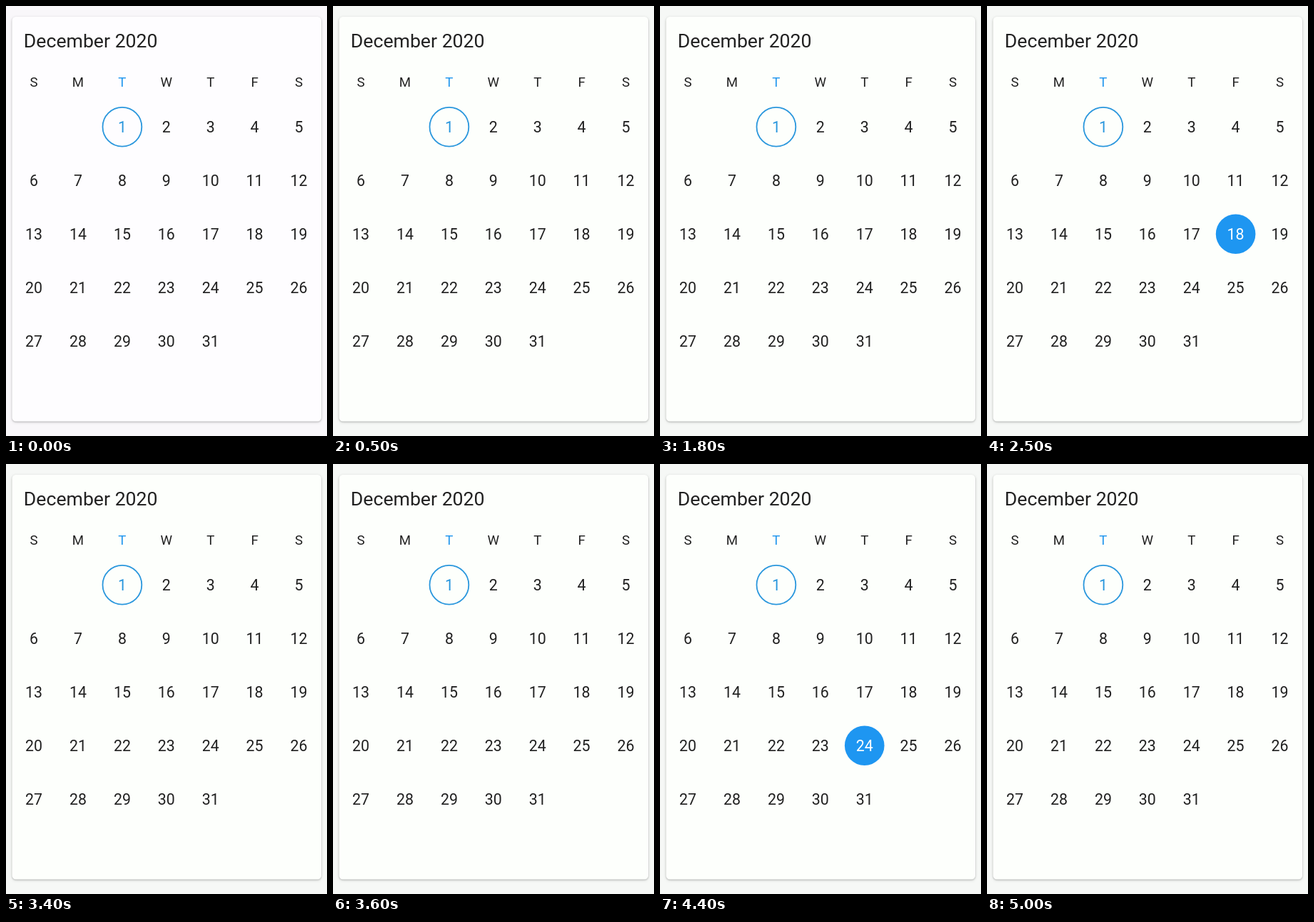
Write an HTML page that moves like this. It is 450 by 602 pixels and loops after 6300 ms.

```html
<!DOCTYPE html>
<html lang="en">
<head>
<meta charset="utf-8">
<title>Calendar</title>
<style>
  html, body { margin: 0; width: 100%; height: 100%; overflow: hidden; }
  body { background: #f6f8f6; animation: page 6.3s infinite; }
  svg { display: block; width: 450px; height: 602px; font-family: Roboto, sans-serif; fill: #212121; }
  .card {
    fill: #fdfffc;
    filter: drop-shadow(0 1px 1px rgba(0, 0, 0, .22)) drop-shadow(0 1px 2px rgba(0, 0, 0, .1));
    animation: card 6.3s infinite;
  }
  .title { font-size: 26.67px; }
  .week { font-size: 18.67px; text-anchor: middle; }
  .day { font-size: 21.33px; text-anchor: middle; }
  .week.today { fill: #2196ee; }
  .day.today { fill: #2a97dd; }
  .ring { fill: none; stroke: #2a97dd; stroke-width: 1.8; }
  .pick { opacity: 0; animation: 6.3s step-end infinite; }
  .pick circle { fill: #1e96f1; }
  .pick text { fill: #fff; }
  #pick16 { animation-name: first; }
  #pick18 { animation-name: second; }
  #pick24 { animation-name: third; }

  @keyframes page {
    0% { background: #f9f7fa; }
    1.585% { background: #f9f7fa; animation-timing-function: steps(5, jump-start); }
    9.52%, 100% { background: #f6f8f6; }
  }
  @keyframes card {
    0% { fill: #fefdff; }
    1.585% { fill: #fefdff; animation-timing-function: steps(5, jump-start); }
    9.52%, 100% { fill: #fdfffc; }
  }
  @keyframes first { 0%, 28.57%, 100% { opacity: 0; } 19.04% { opacity: 1; } }
  @keyframes second { 0%, 52.38%, 100% { opacity: 0; } 39.68% { opacity: 1; } }
  @keyframes third { 0%, 77.77%, 100% { opacity: 0; } 68.25% { opacity: 1; } }
</style>
</head>
<body>
<svg id="cal" viewBox="0 0 450 602">
  <rect class="card" x="8.5" y="15" width="433.5" height="566.5" rx="5.3"/>
  <text class="title" x="24.8" y="58">December 2020</text>
</svg>
<script>
  const cal = document.getElementById('cal');
  const START = 2; // the month begins on a Tuesday

  function add(parent, tag, attrs, text) {
    const el = document.createElementNS('http://www.w3.org/2000/svg', tag);
    for (const key in attrs) el.setAttribute(key, attrs[key]);
    if (text) el.textContent = text;
    return parent.appendChild(el);
  }

  const colX = col => 39.1 + 61.9 * col;

  function place(day) {
    const cell = day - 1 + START;
    return { x: colX(cell % 7), y: 169.2 + 75 * Math.floor(cell / 7) };
  }

  function label(parent, day, extra = '') {
    const { x, y } = place(day);
    add(parent, 'text', { class: 'day ' + extra, x, y: y + 7.9 }, String(day));
  }

  [...'SMTWTFS'].forEach((name, col) =>
    add(cal, 'text', { class: col === START ? 'week today' : 'week', x: colX(col), y: 113 }, name));

  for (let day = 1; day <= 31; day++) label(cal, day, day === 1 ? 'today' : '');

  const first = place(1);
  add(cal, 'circle', { class: 'ring', cx: first.x, cy: first.y, r: 27.4 });

  for (const day of [16, 18, 24]) {
    const { x, y } = place(day);
    const group = add(cal, 'g', { class: 'pick', id: 'pick' + day });
    add(group, 'circle', { cx: x, cy: y, r: 27.8 });
    label(group, day);
  }
</script>
</body>
</html>
```
